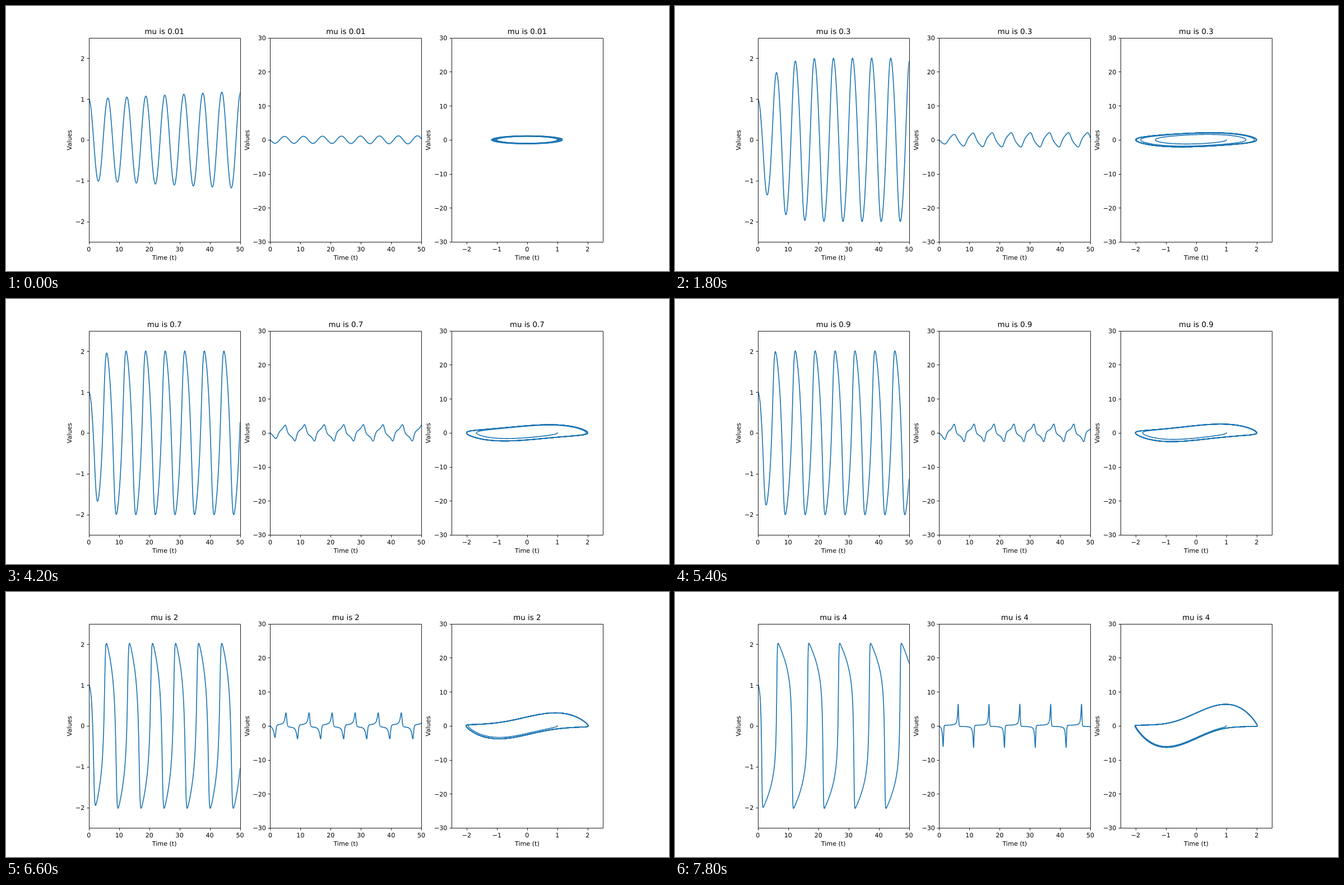
These frames come from a looping animation (1183x473 px, 8000 ms). An HTML page:

```html
<!DOCTYPE html>
<html>
<head>
<meta charset="utf-8">
<style>
  html, body { margin: 0; width: 100%; height: 100%; overflow: hidden; background: #fff; }
  svg { display: block; }
  text { font: 11.11px "DejaVu Sans", sans-serif; text-anchor: middle; text-rendering: geometricPrecision; }
  .title { font-size: 13.33px; }
  .tick { text-anchor: end; }
  .frame { fill: none; stroke: #000; stroke-width: 0.9; }
  .curve { fill: none; stroke: #1f77b4; stroke-width: 1.667; stroke-linejoin: round; stroke-linecap: square; }
</style>
</head>
<body>
<svg id="stage" width="1183" height="473" viewBox="0 0 1183 473"></svg>
<script>
const stage = document.getElementById('stage');
const W = 1183, H = 473, STEP = 600, LOOP = 8000;
const MUS = [0.01, 0.1, 0.2, 0.3, 0.4, 0.5, 0.6, 0.7, 0.8, 0.9, 1, 2, 3, 4];
const DT = 0.02, T_END = 50, CHUNK = 250;

// Three equal axes with a gap of a fifth of their width
const box = { y: 0.12 * H, h: 0.77 * H, w: 0.775 * W / 3.4 };
const time = { min: 0, max: 50, ticks: [0, 10, 20, 30, 40, 50] };
const position = { min: -2.5, max: 2.5, ticks: [-2, -1, 0, 1, 2] };
const speed = { min: -30, max: 30, ticks: [-30, -20, -10, 0, 10, 20, 30] };
const panels = [
  { xAxis: time, yAxis: position, point: s => [s.t, s.x], labelX: 117 },
  { xAxis: time, yAxis: speed, point: s => [s.t, s.v], labelX: 433.5 },
  { xAxis: position, yAxis: speed, point: s => [s.x, s.v], labelX: 757 }
];
panels.forEach((p, i) => {
  p.left = 0.125 * W + i * box.w * 1.2;
  p.px = v => p.left + (v - p.xAxis.min) / (p.xAxis.max - p.xAxis.min) * box.w;
  p.py = v => box.y + box.h - (v - p.yAxis.min) / (p.yAxis.max - p.yAxis.min) * box.h;
});

const snap = v => Math.floor(v + 0.5) + 0.5;
const label = v => String(v).replace('-', '\u2212');

function axes(p, i) {
  const x0 = snap(p.left), x1 = snap(p.left + box.w);
  const y0 = snap(box.y), y1 = snap(box.y + box.h);
  const mid = p.left + box.w / 2;
  let lines = `M${x0} ${y0}H${x1}V${y1}H${x0}Z`, texts = '';
  for (const v of p.xAxis.ticks) {
    lines += `M${snap(p.px(v))} ${y1}v3.9`;
    texts += `<text x="${p.px(v)}" y="438">${label(v)}</text>`;
  }
  for (const v of p.yAxis.ticks) {
    const y = p.py(v);
    lines += `M${x0} ${snap(y)}h-3.9`;
    texts += `<text class="tick" x="${p.left - 7.6}" y="${Math.round(y + 4.5)}">${label(v)}</text>`;
  }
  return `<clipPath id="clip${i}"><rect x="${p.left}" y="${box.y}" width="${box.w}" height="${box.h}"/></clipPath>
    <g class="curve" clip-path="url(#clip${i})"></g>
    <path class="frame" d="${lines}"/>${texts}
    <text x="${mid}" y="453">Time (t)</text>
    <text transform="translate(${p.labelX} ${box.y + box.h / 2 + 0.5}) rotate(-90)">Values</text>
    <text class="title" x="${mid}" y="50"></text>`;
}

// Van der Pol oscillator from x = 1, v = 0, solved with fourth-order Runge-Kutta
function solve(mu) {
  const acc = (x, v) => mu * (1 - x * x) * v - x;
  const states = [];
  let x = 1, v = 0;
  for (let n = 0; n <= T_END / DT; n++) {
    states.push({ t: n * DT, x, v });
    const a1 = acc(x, v);
    const v2 = v + a1 * DT / 2, a2 = acc(x + v * DT / 2, v2);
    const v3 = v + a2 * DT / 2, a3 = acc(x + v2 * DT / 2, v3);
    const v4 = v + a3 * DT, a4 = acc(x + v3 * DT, v4);
    x += DT / 6 * (v + 2 * v2 + 2 * v3 + v4);
    v += DT / 6 * (a1 + 2 * a2 + 2 * a3 + a4);
  }
  return states;
}

// The orbit is stroked in pieces so that repeated laps build up at the edges
function curve(p, states) {
  const points = states.map(s => {
    const [a, b] = p.point(s);
    return p.px(a).toFixed(2) + ' ' + p.py(b).toFixed(2);
  });
  const size = p.xAxis === time ? points.length : CHUNK;
  let paths = '';
  for (let n = 0; n < points.length - 1; n += size) {
    paths += `<path d="M${points.slice(n, n + size + 1).join('L')}"/>`;
  }
  return paths;
}

stage.innerHTML = panels.map(axes).join('');
const curves = stage.querySelectorAll('g.curve');
const titles = stage.querySelectorAll('.title');
const drawings = MUS.map(mu => {
  const states = solve(mu);
  return panels.map(p => curve(p, states));
});

let shown = -1;
function show(index) {
  if (index === shown) return;
  shown = index;
  panels.forEach((p, i) => {
    curves[i].innerHTML = drawings[index][i];
    titles[i].textContent = 'mu is ' + MUS[index];
  });
}

const start = performance.now();
function tick() {
  show(Math.floor((performance.now() - start) % LOOP / STEP));
  requestAnimationFrame(tick);
}
tick();
</script>
</body>
</html>
```
